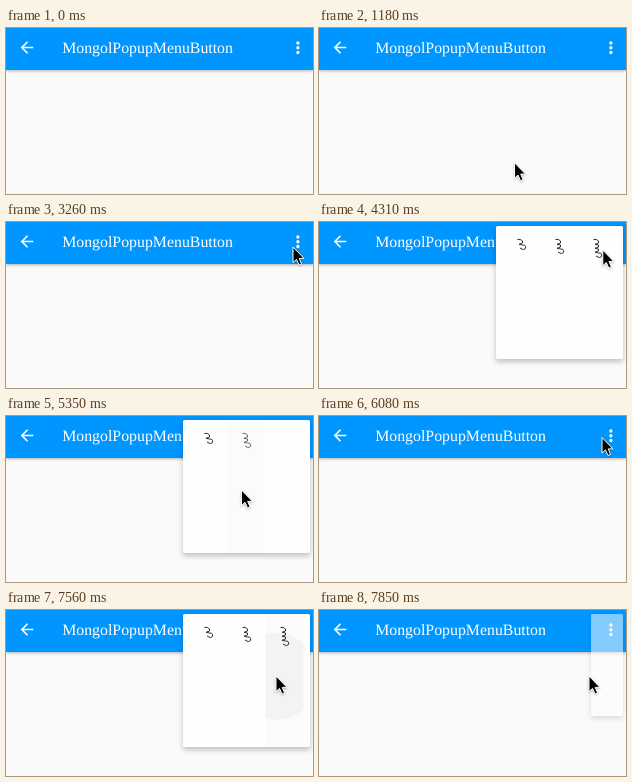
Write an HTML page that moves like this. It is 307 by 166 pixels and loops after 8000 ms.

```html
<!DOCTYPE html>
<html lang="en">
<head>
<meta charset="utf-8">
<title>Popup menu</title>
<style>
  html, body { margin: 0; width: 100%; height: 100%; overflow: hidden; background: #fafafa; }
  #stage { position: relative; width: 307px; height: 166px; overflow: hidden; background: #fafafa; }
  #bar { position: absolute; inset: 0 0 auto; height: 42px; background: #0096ff; box-shadow: 0 1px 3px rgba(0,0,0,.3); }
  svg { position: absolute; left: 0; top: 0; overflow: visible; }
  #title { font: 15.85px "Liberation Serif", "Times New Roman", serif; fill: #fff; text-rendering: geometricPrecision; }
  #menu { position: absolute; right: 3px; top: 3.5px; border-radius: 1.6px; background: #fefefe;
    box-shadow: 0 3px 5px rgba(0,0,0,.18), 0 2px 8px rgba(0,0,0,.07); }
  #clip { position: absolute; inset: 0; overflow: hidden; border-radius: inherit; }
  #clip svg { left: auto; right: 0; overflow: hidden; }
  #words { fill: none; stroke: #2c2c2c; stroke-linejoin: round; }
  #cursor { filter: drop-shadow(0 1px 1px rgba(0,0,0,.25)); }
</style>
</head>
<body>
<div id="stage">
  <div id="bar">
    <svg width="307" height="42" fill="#fff">
      <path transform="translate(11.5 10) scale(.79)" d="M20 11H7.83l5.59-5.59L12 4l-8 8 8 8 1.41-1.41L7.83 13H20z"/>
      <text id="title" x="56.2" y="24.8">MongolPopupMenuButton</text>
      <path d="M291.9 15v0m0 4.75v0m0 4.75v0" stroke="#fff" stroke-width="3.3" stroke-linecap="round"/>
    </svg>
  </div>
  <div id="menu"><div id="clip">
    <svg width="127" height="133.5">
      <clipPath id="cell"><rect id="cellBox" width="38" height="133.5"/></clipPath>
      <g id="ripple" clip-path="url(#cell)">
        <rect width="127" height="133.5" opacity=".01"/>
        <circle id="splash" opacity=".03"/>
      </g>
      <g id="words"></g>
    </svg>
  </div></div>
  <svg width="307" height="166">
    <path id="cursor" d="M0 0V15.6L3.5 12.4 6 18 8.6 16.9 6.2 11.4H11Z" stroke="#fff"/>
  </svg>
</div>
<script>
const LOOP = 8000, TICKS = 54, LEAD = 17;
const CELL = 38, MARGIN = 6.5;
const MENU = { x: 177, y: 3.5, width: 127, height: 133.5 };

// All times below are in ticks; the picture changes once per tick.
const moves = [
  { start: 2, end: 3, x: 171, y: 164 },
  { start: 5, end: 13, x: 287, y: 25 },
  { start: 28, end: 32, x: 235.5, y: 74 },
  { start: 37, end: 41, x: 283, y: 21.5 },
  { start: 45, end: 50, x: 270, y: 66 }
];
const visits = [
  { open: 23, close: 35.34, item: 1 },
  { open: 43.4, close: 51.34, item: 2 }
];

const $ = id => document.getElementById(id);
const set = (node, attrs) => Object.entries(attrs).forEach(([k, v]) => node.setAttribute(k, v));
const ramp = (v, start, length) => Math.min(1, Math.max(0, (v - start) / length));
const ease = u => u < .5 ? 4 * u ** 3 : 1 - 4 * (1 - u) ** 3;

// A vertical word: a crown, a stem with teeth to its left, and a curled tail.
function wordPath(teeth) {
  let d = 'M-4 .5Q-1-.5 1 2';
  for (let i = 0; i < teeth; i++) d += 'v2l-3.5 1.3 3.5 .7';
  return d + 'q4 0 3 3t-5.5 0';
}

const words = [1, 2, 3].map((teeth, i) => {
  const word = document.createElementNS('http://www.w3.org/2000/svg', 'path');
  set(word, { d: wordPath(teeth), transform: `translate(${MARGIN + CELL * (i + .5)} 13)` });
  $('words').append(word);
  return word;
});

function pointerAt(tick) {
  let x = 171, y = 190;
  for (const m of moves) {
    const u = ease(ramp(tick, m.start, m.end - m.start));
    x += (m.x - x) * u;
    y += (m.y - y) * u;
  }
  return { x, y };
}

function drawMenu(p) {
  const unit = 1 / (words.length + 1.5);
  Object.assign($('menu').style, {
    opacity: ramp(p, 0, 1 / 3),
    width: MENU.width * ramp(p, 0, words.length * unit) + 'px',
    height: MENU.height * ramp(p, 0, unit) + 'px'
  });
  words.forEach((word, i) => set(word, { opacity: ramp(p, (i + 1) * unit, 1.5 * unit) }));
}

function drawRipple(tick, { close, item }, { x, y }) {
  const age = tick - close + 2;
  set($('ripple'), { opacity: age > 0 && age < 3 ? 1 : 0 });
  set($('cellBox'), { x: MARGIN + CELL * item });
  set($('splash'), { cx: x - MENU.x, cy: y - MENU.y, r: age < 2 ? 26 * Math.max(0, age) : 0 });
}

function draw(t) {
  const tick = Math.min(TICKS - 1, Math.floor((t + LEAD) * TICKS / LOOP));
  const pointer = pointerAt(tick);
  const visit = visits.findLast(v => tick >= v.open) || visits[0];
  set($('cursor'), { transform: `translate(${pointer.x} ${pointer.y})` });
  drawMenu(ramp(tick, visit.open, 2) - ramp(tick, visit.close, 2));
  drawRipple(tick, visit, pointer);
}

function frame() {
  draw(performance.now() % LOOP);
  requestAnimationFrame(frame);
}
frame();
</script>
</body>
</html>
```
